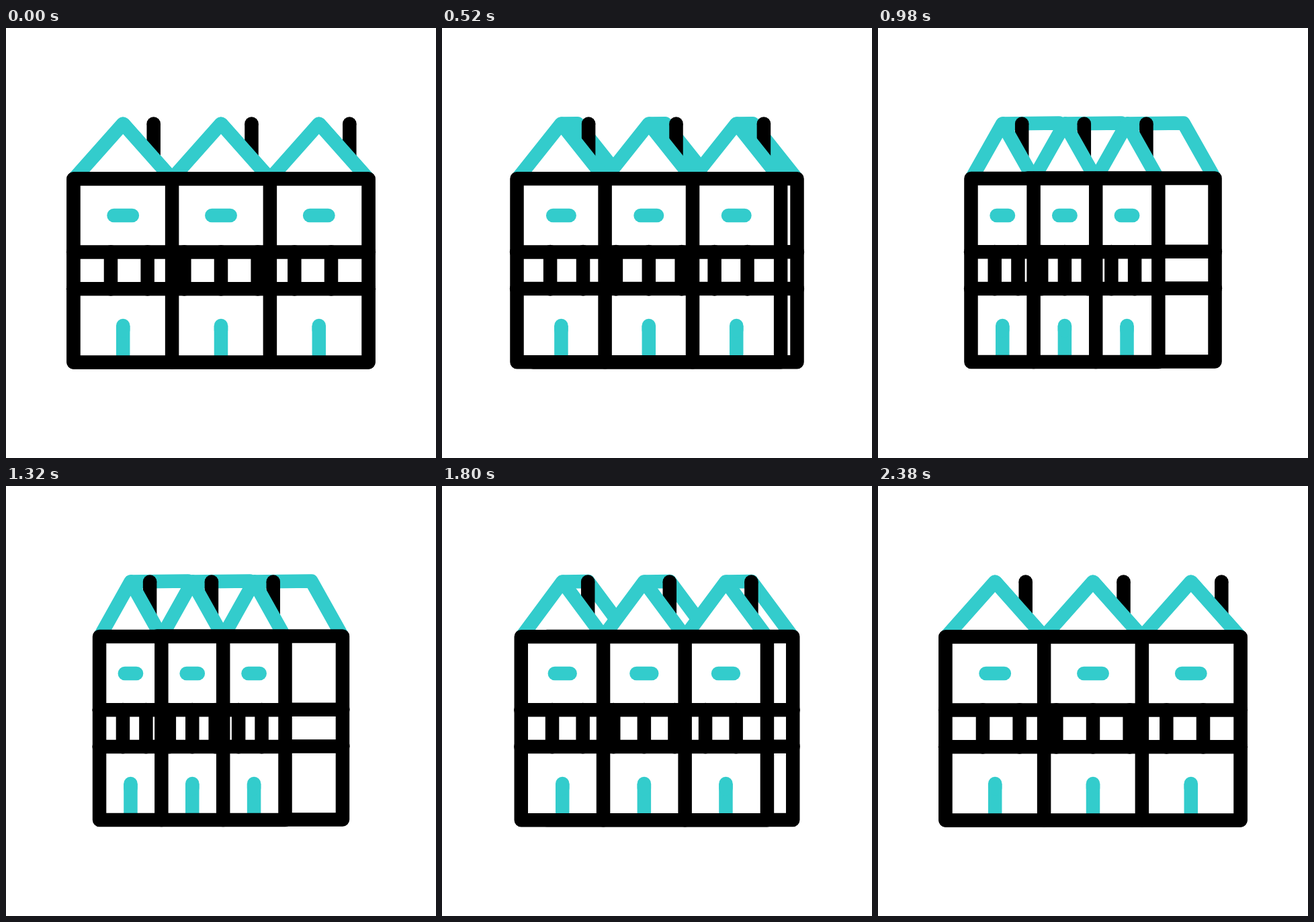
An HTML page with a canvas for the animation above (2.4 s loop, 640x640 px).

```html
<!DOCTYPE html>
<html lang="en">
<head>
<meta charset="utf-8">
<title>Row houses</title>
<style>
  html, body { margin: 0; width: 100%; height: 100%; overflow: hidden; background: #fff; }
  canvas { display: block; }
</style>
</head>
<body>
<canvas id="stage" width="640" height="640"></canvas>
<script>
const ctx = document.getElementById('stage').getContext('2d');
const TEAL = '#33cccc', BLACK = '#000', WHITE = '#fff';
const LOOP = 2400, SWING = 2380;
const LEFT = 100.5, RIGHT = 539.5, TOP = 224.4, BOTTOM = 497.4;
const ROWS = [333.5, 388.2];
const EAVE = 101.3, HOUSE = 145.8, RIDGE = 142.4;

// cubic-bezier(.76, 0, .24, 1), solved by bisection
function ease(x) {
  let lo = 0, hi = 1, s = 0.5;
  for (let i = 0; i < 30; i++) {
    s = (lo + hi) / 2;
    const bx = 3 * s * (1 - s) * ((1 - s) * 0.76 + s * 0.24) + s * s * s;
    if (bx < x) lo = s; else hi = s;
  }
  return s * s * (3 - 2 * s);
}

function trace(points) {
  ctx.beginPath();
  points.forEach(([x, y]) => ctx.lineTo(x, y));
}

function fill(points) {
  trace(points);
  ctx.fillStyle = WHITE;
  ctx.fill();
}

function stroke(color, points, cap = 'round') {
  trace(points);
  ctx.strokeStyle = color;
  ctx.lineCap = cap;
  ctx.stroke();
}

function box(x0, x1, lift) {
  const top = TOP - lift, bottom = BOTTOM - lift;
  ctx.beginPath();
  ctx.rect(x0, top, x1 - x0, bottom - top);
  ctx.strokeStyle = BLACK;
  ctx.stroke();
  ROWS.forEach(y => stroke(BLACK, [[x0 - 0.4, y - lift], [x1 + 0.4, y - lift]]));
}

function draw(p) {
  const left = LEFT + 38.85 * p;
  const right = RIGHT - 125 * p;
  const depth = 86.15 * p;
  const lift = 0.3 * p, backLift = 0.8 * p;
  const fx = x => left + (x - LEFT) * (right - left) / (RIGHT - LEFT);

  ctx.clearRect(0, 0, 640, 640);
  ctx.lineWidth = 20.5;
  ctx.lineJoin = 'round';

  // Roofs: sloping plane, chimney, then the front gable
  for (let i = 0; i < 3; i++) {
    const x = EAVE + HOUSE * i;
    const a = [fx(x), TOP];
    const apex = [fx(x + HOUSE / 2), RIDGE];
    const b = [fx(x + HOUSE), TOP];
    const backApex = [apex[0] + depth, RIDGE - backLift];
    const backEave = [b[0] + depth, TOP - backLift];
    fill([apex, backApex, backEave, b]);
    stroke(TEAL, [apex, backApex, backEave], 'butt');

    const cx = fx(x + 118.4);
    stroke(BLACK, [[cx, RIDGE], [cx, RIDGE + 0.1]]);
    stroke(BLACK, [[cx, RIDGE], [cx, 192]], 'butt');

    fill([a, apex, b]);
    stroke(TEAL, [a, apex, b], 'butt');
  }

  // Walls
  box(left + depth, right + depth, backLift);
  fill([[left, TOP], [right, TOP], [right, BOTTOM], [left, BOTTOM]]);
  for (let i = 0; i < 3; i++) {
    const x = EAVE + HOUSE * (i + 0.5);
    stroke(TEAL, [[fx(x - 13.7), 279], [fx(x + 13.7), 279]]);
    stroke(TEAL, [[fx(x), 443], [fx(x), BOTTOM]], 'butt');
    stroke(TEAL, [[fx(x), 443], [fx(x), 450]]);
  }
  box(left, right, lift);
  for (let i = 1; i < 3; i++) {
    const x = fx(EAVE + HOUSE * i);
    stroke(BLACK, [[x, TOP - lift], [x, BOTTOM - lift]]);
  }
  for (let i = 1; i < 8; i++) {
    const x = fx(EAVE + HOUSE * 3 / 8 * i);
    stroke(BLACK, [[x, ROWS[0] - lift - 0.3], [x, ROWS[1] - lift + 0.3]]);
  }
}

function tick() {
  const t = Math.min(performance.now() % LOOP, SWING);
  draw(ease(1 - Math.abs(2 * t / SWING - 1)));
  requestAnimationFrame(tick);
}
tick();
</script>
</body>
</html>
```
